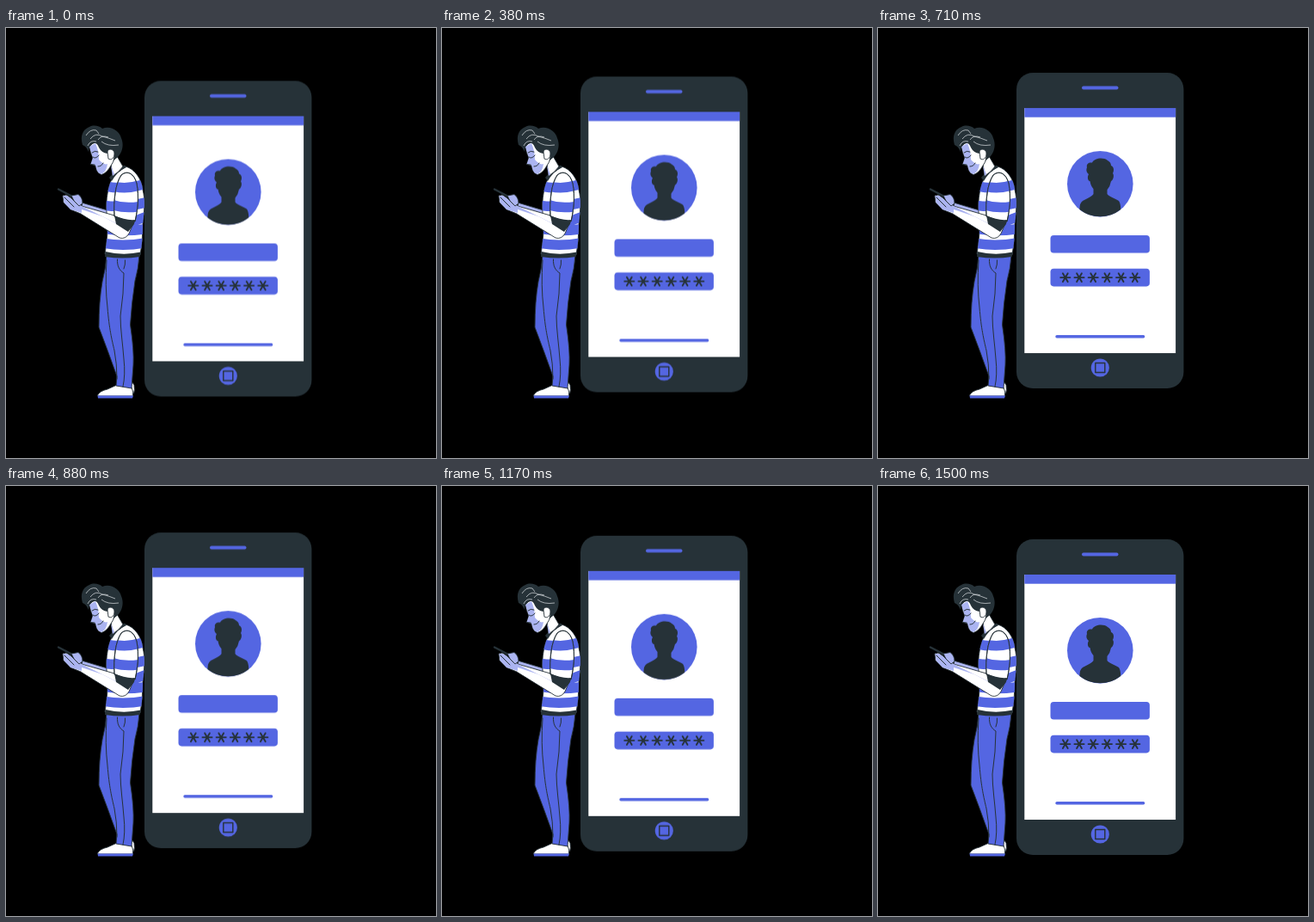
An HTML page without scripts for the animation above (1.54 s loop, 500 by 500 pixels).

```html
<!DOCTYPE html>
<html lang="en">
<head>
<meta charset="utf-8">
<title>Login</title>
<style>
  html, body { margin: 0; width: 100%; height: 100%; overflow: hidden; background: #000; }
  svg { display: block; width: 100%; height: 100%; }
  .blue { fill: #5466e2; }
  .dark { fill: #263238; }
  .white { fill: #fff; }
  .skin { fill: #abb4f1; }
  .line { fill: none; stroke: #263238; stroke-width: 1; stroke-linecap: round; stroke-linejoin: round; }
  .edge { stroke: #263238; stroke-width: .9; stroke-linejoin: round; }
  .stripes { fill: none; stroke: #5466e2; stroke-width: 11.5; }
  .phone { animation: float 1540ms -5ms infinite; }
  /* 24 fps: 17 steps up, 19 steps down, one held */
  @keyframes float {
    0% { transform: translateY(-.5px); animation-timing-function: steps(17); }
    45.946% { transform: translateY(-9.95px); animation-timing-function: steps(19); }
    97.297%, 100% { transform: translateY(0); }
  }
</style>
</head>
<body>
<svg viewBox="0 0 500 500">
  <defs>
    <g id="star" class="line" style="stroke-width:1.9">
      <path d="M-5.6 0H5.6M-2.9-4.8 2.9 4.8M2.9-4.8-2.9 4.8"/>
    </g>
    <path id="torso" d="M126 169C131 168 135 164 139 161C150 164 158 176 159 188C162 199 161 212 159 228Q159 248 156 264Q136 267 115 263Q117 250 118 238L117 214C116 200 118 184 126 169Z"/>
    <path id="sleeve" d="M134 171C141 165 149 169 152 181C155 196 153 212 150 225Q138 225 126 219C125 201 127 181 134 171Z"/>
    <clipPath id="torsoClip"><use href="#torso"/></clipPath>
    <clipPath id="sleeveClip"><use href="#sleeve"/></clipPath>
  </defs>

  <g class="phone">
    <rect class="dark" x="161" y="62" width="194.4" height="367" rx="19"/>
    <rect class="white" x="170.3" y="103" width="175.8" height="285"/>
    <rect class="blue" x="170.3" y="103" width="175.8" height="10.7"/>
    <rect class="blue" x="237" y="77.6" width="42.5" height="4" rx="2"/>
    <circle class="blue" cx="258.3" cy="191.2" r="38.3"/>
    <path class="dark" d="M243 172C242 168 245 166 249 166.500C252 161 262 160 267 164Q271 166 271 170C274 171 275 175 273 179C275 181 273.500 187 271 188Q270 194 266.500 198V203C268 206 276 208 280 211Q282.200 214 282.200 221A38.300 38.300 0 0 1 234.400 221Q234.500 213 238 211C243 208 249 206 250.500 203V197Q247.500 194 246.500 188C244 188 243 183 245 180C242 177 242 175 243 172Z"/>
    <rect class="blue" x="200.5" y="251" width="115.4" height="20.6" rx="3.8"/>
    <rect class="blue" x="200.5" y="289.8" width="115.4" height="20.6" rx="3.8"/>
    <g transform="translate(217.8 300.1)">
      <use href="#star"/>
      <use href="#star" x="16.2"/>
      <use href="#star" x="32.4"/>
      <use href="#star" x="48.6"/>
      <use href="#star" x="64.8"/>
      <use href="#star" x="81"/>
    </g>
    <rect class="blue" x="206.3" y="367" width="104" height="3.4" rx="1.7"/>
    <circle class="blue" cx="258.3" cy="405" r="10.6"/>
    <rect class="line" style="stroke-width:1.4" x="252.8" y="399.5" width="11" height="11"/>
  </g>

  <g class="man">
    <!-- shoes -->
    <path class="white edge" d="M146 411 149 415Q150 421 148.500 425L143 424Z"/>
    <path class="white edge" d="M106.500 427Q109 422 118 420L128 415.500 146 418Q148.500 423 147.500 428H107Z"/>
    <path class="blue" d="M106.500 427.500H148L147 430.500H107Z"/>

    <!-- trousers -->
    <path class="blue edge" d="M117 264H155Q154 280 150 294Q146 320 144.500 345Q149 375 148 392L146 419 128 416 129 405Q118 374 108 348Q108 318 112 295Q116 280 117 264Z"/>
    <path class="line" d="M117 270Q115 300 118 325C120 350 123 362 126 375Q129 390 129 408M129.500 269C129 277 132 282 137 285Q137 308 133 335C133 350 136 370 137 385Q139 403 136 417M138.500 270Q139 275 137 280"/>

    <!-- far arm -->
    <path class="skin edge" d="M118 212 88 203 82 194Q86 193 89 203L87 211 118 221Z"/>

    <!-- shirt -->
    <use href="#torso" class="white edge"/>
    <g clip-path="url(#torsoClip)">
      <path class="stripes" d="M112 183Q137 190 166 180M112 206Q137 210 166 202M112 228Q137 231 166 218M112 233Q138 238 166 233M112 250Q138 255 166 249"/>
    </g>
    <path class="dark" d="M115.500 260Q136 265 157 260.500L155.500 266Q136 269 115 266Z"/>
    <path class="dark" d="M120 174Q127 165 138 159.500L140 162Q129 167 123 178Z"/>

    <!-- neck and head -->
    <path class="white edge" d="M122 158 129 149 136 161Q131 168 124 172Z"/>
    <path class="skin" d="M122 160 126 170 124 172Z"/>
    <path class="white edge" d="M97 138Q103 130 114 133L126 141Q128 152 122 160Q117 169 111 170.500Q107 169 105.500 165L104 159.500 98.500 158.500 101 151Q98 145 97 138Z"/>
    <path class="skin" d="M97 138 104 134Q108 143 108 153Q114 160 118 158Q117 167 111 170Q107 169 105.500 165L104 159.500 98.500 158.500 101 151Z"/>
    <path class="line" d="M101 150Q104 153 108 148M100 145Q103 142 107 144M107 161Q111 161 113 157M98.500 158.500 103 159"/>
    <path class="dark" d="M89 136C86 126 89 118 97 115C102 112 109 114 112 117C122 113 132 120 134 128C138 137 134 147 129 151L125 154Q127 147 124 142Q119 140 118 146Q111 145 108 139Q106 133 101 134Q96 137 96 144Q93 137 89 136Z"/>
    <path class="white edge" d="M118 144C119 139 126 141 126 146C126 152 122 154 119 152Z"/>
    <path d="M93 125Q98 117 105 119L108 123M98 129Q104 121 112 126Q120 128 127 131M107 130Q111 124 119 127M95 137Q98 130 105 132M111 132Q118 138 131 136" fill="none" stroke="#dfe3e6" stroke-width=".7"/>

    <!-- near arm -->
    <path class="white edge" d="M126 218 149 225 143 239Q139 246 132 244L87 216 75 211 67 203 66 195 70 194 80 201 88 207Z"/>
    <path class="skin" d="M66.500 195 71 195 88 207 132 229 139 238 88 215 75 211 67.500 203Z"/>
    <path class="white" d="M88 211 112 219 139 233 142 238Q138 245 132 243L88 216Z"/>
    <use href="#sleeve" class="white edge"/>
    <g clip-path="url(#sleeveClip)">
      <path class="stripes" d="M122 183Q138 189 158 182M122 205Q138 211 158 207"/>
    </g>
    <use href="#sleeve" class="line"/>
    <path class="dark" d="M126 218Q139 224 150 223L149 228 142 237 128 228Z"/>

    <!-- handheld and fingers -->
    <path d="M61 187.500 83 199" fill="none" stroke="#263238" stroke-width="2.4" stroke-linecap="round"/>
    <path class="skin edge" d="M76 195 84 193.500Q89 197 89 204L85 207 79 201Z"/>
    <path class="line" d="M68 197 79 208M74 196 83 205"/>
  </g>
</svg>
</body>
</html>
```
